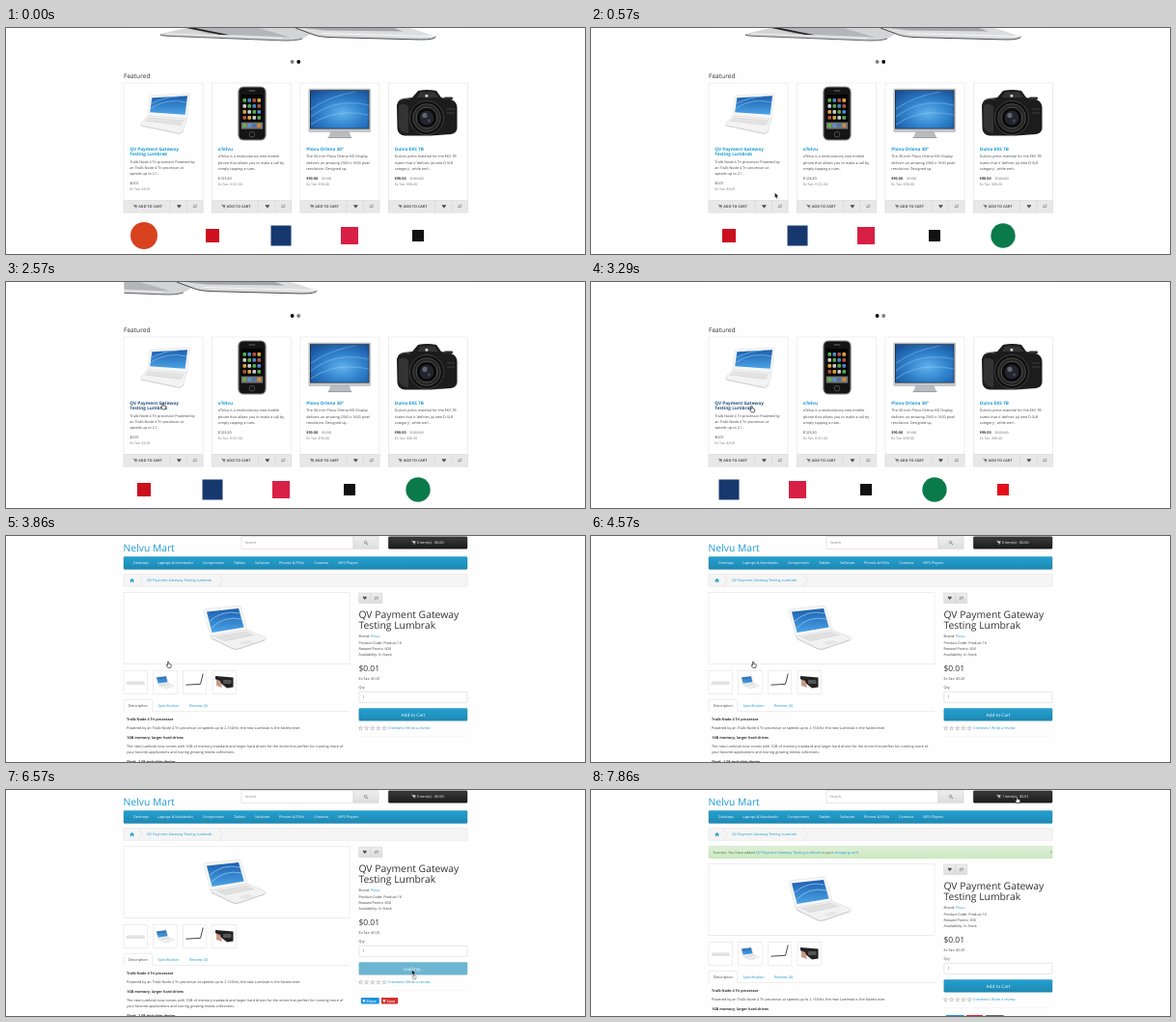
These frames come from a looping animation (600 px wide and 234 px high, 8 s). An HTML page:

```html
<!DOCTYPE html>
<html lang="en">
<head>
<meta charset="utf-8">
<title>Shop demo</title>
<style>
html, body { margin: 0; width: 100%; height: 100%; overflow: hidden; background: #fefefe; }
svg { display: block; width: 100%; height: 100%; }
text { font-family: "Open Sans", "Noto Sans", sans-serif; text-rendering: geometricPrecision; white-space: pre; }
.card { fill: #fff; stroke: #ddd; stroke-width: .5; }
.panel { fill: #fff; filter: drop-shadow(0 .4px .7px rgba(0,0,0,.22)); }
</style>
</head>
<body>
<svg id="stage" viewBox="0 0 600 234" preserveAspectRatio="none"></svg>
<script>
const LOOP = 8000, TICK = LOOP / 56;
const BLUE = '#1b9bd0', TEXT = '#454545', DARK = '#333';

// ---- drawing helpers ----
const text = (x, y, s, o = {}) =>
  `<text x="${x}" y="${y}" font-size="${o.size || 3.74}" fill="${o.fill || TEXT}"` +
  ` font-weight="${o.weight || 400}" text-anchor="${o.anchor || 'start'}"` +
  `${o.id ? ` id="${o.id}"` : ''}${o.strike ? ' text-decoration="line-through"' : ''}>${s}</text>`;
const rect = (x, y, w, h, fill, more = '') =>
  `<rect x="${x}" y="${y}" width="${w}" height="${h}" fill="${fill}" ${more}/>`;
const circle = (x, y, r, fill, more = '') => `<circle cx="${x}" cy="${y}" r="${r}" fill="${fill}" ${more}/>`;
const path = (d, fill, more = '') => `<path d="${d}" fill="${fill}" ${more}/>`;
const group = (id, s, more = '') => `<g id="${id}" ${more}>${s}</g>`;
const line = (c, w = .5) => `stroke="${c}" stroke-width="${w}"`;
const stops = cs => cs.map((c, i) => `<stop offset="${i / (cs.length - 1)}" stop-color="${c}"/>`).join('');
const grad = (id, ...cs) => `<linearGradient id="${id}" x2="0" y2="1">${stops(cs)}</linearGradient>`;
const at = (x, y, s, k = 1) => `<g transform="translate(${x} ${y}) scale(${k})">${s}</g>`;

const heart = (x, y, c = '#555') => at(x, y, path('M0 1.9L-1.9-.1A1.05 1.05 0 0 1 0-1.1A1.05 1.05 0 0 1 1.9-.1Z', c));
const swap = (x, y) => at(x, y, path('M-2-.8H2L1-1.6M2 .8H-2L-1 1.6', 'none', line('#777', .6)));
const cart = (x, y, c) => at(x, y,
  path('M-2.2-1.6H-1.2L-.5.5H1.6', 'none', line(c)) + path('M-1-1.2H2L1.5.2H-.6Z', c) +
  circle(-.2, 1.3, .45, c) + circle(1.3, 1.3, .45, c));

// ---- product pictures ----
const whiteLaptop =
  path('M149 71Q149 70 150 70L189 67.8Q190.5 67.8 190.3 69L187.3 94 146.8 90.5Z', '#f6f6f6', line('#ddd')) +
  path('M151.3 72.2L188 70.2 185.6 89.8 149.2 87.3Z', 'url(#screen)') +
  path('M150 83Q168 72 187 77M151 78Q166 71 178 71', 'none', line('#8cc6f0', .6)) +
  path('M146.8 91L187.3 94.3 183.5 107 180 109.5 141 101.5Q138 100 140 98.2Z', '#f3f3f3', line('#d6d6d6')) +
  path('M148 92.5L184.5 95.5 181.5 101 143.5 96.5Z', '#dcdcdc') +
  path('M146.5 93.8L183.5 97.2M145 95.2L182.5 99', 'none', line('#f8f8f8', .4)) +
  path('M140 101L180 109.5 184 106.5', 'none', line('#c0c0c0', .6));

const iconColors = ['#5aa84f', '#d9a441', '#4b86c6', '#c9c9c9', '#a9553f'];
let icons = '';
for (let r = 0; r < 4; r++) for (let c = 0; c < 4; c++)
  icons += rect(245.4 + c * 5, 73 + r * 6, 3.6, 3.8, iconColors[(r * 3 + c * 2) % 5], 'rx=".8"');
for (let c = 0; c < 4; c++) icons += rect(245.4 + c * 5, 99, 3.6, 3.8, ['#5fb548', '#5b93d4', '#4477b5', '#d98a35'][c], 'rx=".8"');
const phone =
  rect(240.9, 61, 28.2, 55, '#141414', 'rx="5" stroke="#8c8c8c" stroke-width="1.1"') +
  rect(243.8, 69, 22.4, 35.6, '#050505') + rect(243.8, 97.6, 22.4, 7, '#777') + icons +
  rect(251.5, 64.6, 7, .9, '#666', 'rx=".4"') + circle(255, 110.2, 2.8, '#111', line('#888'));

const monitor =
  path('M337 106H355L358 113.5H334Z', '#b9bcc0') + path('M333.5 113.6H358.5', 'none', line('#888', .8)) +
  rect(313.8, 63, 63.8, 44.5, '#c6c8cb', 'rx=".8" stroke="#999" stroke-width=".4"') +
  rect(315, 64.3, 61.4, 40.2, '#1a2433') + rect(315.7, 65, 60, 38.8, 'url(#sky)') +
  path('M316 92Q342 72 376 80M316 100Q340 83 376 90M316 84Q334 71 362 66', 'none', line('#9bd0f5', 1.2) + ' opacity=".35"');

const camera =
  path('M405 80Q406 74 412 73L421 72 427 65Q436 62.8 446 65L451 72 461 74Q467.5 76 467.5 83V104Q467 109 461 110L440 111.5H413Q406 110.5 405.5 104Z', '#1c1c1c') +
  path('M407 80Q412 77 417 81V109Q409 109 407 102Z', '#333') +
  path('M408 75Q413 72 419 74', 'none', line('#555', .8)) + path('M426 72L429 66.5H444L448 72Z', '#343434') +
  rect(454, 71.4, 9, 2.6, '#2d2d2d', 'rx="1"') + rect(434.6, 69, 2.6, 2.6, '#ddd') +
  circle(436, 93, 17.5, '#0f0f0f', line('#4a4a4a', .8)) + circle(436, 93, 14.4, '#262626', line('#6a6a6a', .5)) +
  circle(436, 93, 10.8, '#0a0a0a', line('#888', .5)) + circle(436, 93, 7.4, '#23242f') +
  circle(434, 90.4, 2.6, '#62656f') + circle(438.4, 96, 1.7, '#45414a') +
  path('M457 84H465M457 88H465', 'none', line('#3f3f3f', 1));

// ---- listing page ----
const products = [
  { title: ['QV Payment Gateway', 'Testing Lumbrak'], art: whiteLaptop, price: '$0.01', ex: '$0.01',
    desc: ['Trulb Node 4 Tri processor Powered by', 'an Trulb Node 4 Tri processor at', 'speeds up to 2.1..'] },
  { title: ['oTelvu'], art: phone, price: '$123.20', ex: '$101.00',
    desc: ['oTelvu is a revolutionary new mobile', 'phone that allows you to make a call by', 'simply tapping a nam..'] },
  { title: ['Plovu Orlena 30"'], art: monitor, price: '$90.00', old: '$1.00', ex: '$90.00',
    desc: ['The 30-inch Plovu Orlena HD Display', 'delivers an amazing 2560 x 1600 pixel', 'resolution. Designed sp..'] },
  { title: ['Dulvo EKS 7B'], art: camera, price: '$90.00', old: '$122.00', ex: '$80.00',
    desc: ["Dulvo's press material for the EKS 7B", "states that it 'defines (a) new D-SLR", "category', while we'r.."] }
];

function card(p, i) {
  const x = 122 + i * 91.5, tx = x + 6.3, y = 129 + (p.title.length - 1) * 5.4;
  return rect(x, 57, 82, 134, '', 'class="card"') + p.art +
    group('title' + i, p.title.map((s, n) => text(tx, 126.6 + n * 5.1, s, { size: 4.7, weight: 700, fill: 'currentColor' })).join(''), `color="${BLUE}"`) +
    p.desc.map((s, n) => text(tx, y + 5.4 + n * 6.25, s)).join('') +
    text(tx, y + 28, p.price, { fill: DARK, weight: p.old ? 700 : 400 }) +
    (p.old ? text(tx + 16, y + 28, p.old, { fill: '#888', strike: 1 }) : '') +
    text(tx, y + 33.9, 'Ex Tax: ' + p.ex, { fill: '#777', size: 3.6 }) +
    rect(x, 178.3, 82, 12.7, '#e8e8e8', line('#d8d8d8')) +
    path(`M${x + 48} 178.3V191M${x + 65.4} 178.3V191`, 'none', line('#d2d2d2')) +
    cart(x + 12, 184.6, '#555') + text(x + 15.3, 186, 'ADD TO CART', { weight: 700, fill: '#555' }) +
    heart(x + 57.4, 184.6) + swap(x + 73.8, 184.6);
}

const marks = [
  ['o', 14, '#d8421f'], ['s', 7, '#cc1020'], ['s', 10.5, '#16386f'], ['s', 9, '#d81f45'],
  ['s', 6, '#111'], ['o', 12.7, '#0b7a4b'], ['s', 6, '#e3101c']
];
const markRow = marks.map(([kind, r, c], i) => kind === 'o'
  ? circle(143 + i * 71, 215, r, c) : rect(143 + i * 71 - r, 215 - r, 2 * r, 2 * r, c)).join('');

// two thin laptops, back to back
const banner =
  path('M186 0L160 6Q158 7.2 161 8L283 12.8Q300 13.6 307 11L318 5V0Z', '#d3d4d6') +
  path('M188 0H262L294 9.5 210 6Z', '#b4b5b8') +
  path('M187 0H196L232 7.2 222 7Z', '#222') +
  path('M160 7.2Q162 8 168 8.3L283 12.8Q300 13.6 307 11', 'none', line('#555', .9)) +
  path('M166 5.8L286 10.4', 'none', line('#f4f4f4', .8)) +
  path('M300 0L319 7Q324 9 336 9.6L430 12Q444 12 445.5 9L428 3 418 0Z', '#dcdddf') +
  path('M308 0H402L412 3.5 330 2.5Z', '#a5a6a9') +
  path('M300 0L319 7Q324 9 336 9.6L430 12Q444 12 445.5 9', 'none', line('#4a4a4a', 1)) +
  path('M328 5.5L442 8.6', 'none', line('#fafafa', .9));

const listing =
  rect(122, -20, 356, 47, '', 'class="panel" rx="1.2"') +
  `<g clip-path="url(#slideClip)">${group('banner', banner)}</g>` +
  circle(296.6, 35, 1.9, '#000', 'id="dotA"') + circle(303.2, 35, 1.9, '#000', 'id="dotB"') +
  text(122, 52.2, 'Featured', { size: 6.6, fill: DARK }) +
  products.map(card).join('') +
  rect(122, 199, 356, 32, '', 'class="panel" rx="1.2"') +
  `<g clip-path="url(#markClip)">${group('marks', markRow)}</g>`;

// ---- product page ----
const full = 'QV Payment Gateway Testing Lumbrak';
const bigLaptop =
  path('M205 77.5Q205 76 207 75.6L241 72.2Q243 72 243.5 73.5L250 97 212 104Z', '#f7f7f7', line('#d8d8d8')) +
  path('M208 78.6L241 75 246.5 94.5 213.5 100Z', 'url(#screen)') +
  path('M210 89Q224 76 242 80M212 96Q226 82 244 86', 'none', line('#9ad0f5', .7)) +
  path('M212 104L250 97 269 105Q271 106.5 268 107.8L241 117Q238 118 235 116.8L213 106Z', '#f2f2f2', line('#d4d4d4')) +
  path('M217 104.6L249 98.8 258 102.4 227 109Z', '#d9d9d9') +
  path('M220 106L252 100M223.5 107.5L255 101.2', 'none', line('#f7f7f7', .5)) +
  path('M240 110.5L251 107.8 257 110 246 113Z', '#e6e6e6') +
  path('M213 106L235 116.8Q238 118 241 117L268 107.8', 'none', line('#bbb', .7));

const thumbs = [122, 152.8, 183.4, 214].map(x => rect(x, 139.3, 24.4, 24.2, '', 'class="card"')).join('') +
  path('M125.5 150.5H143L144 153.8H124.5Z', '#d9d9d9') + path('M126 151.5H142.5M125.5 152.7H143', 'none', line('#f4f4f4', .4)) +
  at(165, 151.3, `<g transform="translate(-238 -95)">${bigLaptop}</g>`, .3) +
  path('M186.5 154.2L201.5 153.3M201.5 153.3L204.2 142.5', 'none', line('#333', .9)) +
  path('M217 145L235.5 146.5V156.5L229 157.5 217 148Z', '#222') +
  path('M218 148.5L222 150 224 157 218 155Z', '#c99a86') + rect(225, 149, 8.5, 4, '#555');

const menu = [[132, 'Desktops'], [157, 'Laptops &amp; Notebooks'], [204, 'Components'], [236, 'Tablets'],
  [258, 'Software'], [283, 'Phones &amp; PDAs'], [319.3, 'Cameras'], [344.3, 'MP3 Players']];

const star = x => at(x, 199, path('M0-2L.6-.6 2-.5.9.5 1.2 1.9 0 1.2-1.2 1.9-.9.5-2-.5-.6-.6Z', '#fff', line('#888', .4)));
const bold = { weight: 700, fill: DARK };

const header =
  text(121.6, 16, 'Nelvu Mart', { size: 10.3, fill: BLUE }) +
  rect(244, .8, 116, 12.4, '#fff', line('#ccc')) + text(247.5, 8.4, 'Search', { fill: '#888' }) +
  rect(360, .8, 26, 12.4, 'url(#grey)', line('#ccc')) +
  circle(372.6, 6.6, 1.3, 'none', line('#666', .6)) + path('M373.6 7.6L375 9', 'none', line('#666', .8)) +
  rect(396.3, .8, 81.7, 12.4, 'url(#black)', 'rx="1" stroke="#111" stroke-width=".4"') +
  cart(422.6, 6.6, '#fff') + text(426, 8.2, '', { fill: '#fff', id: 'total' }) +
  rect(122, 21.5, 356, 13, 'url(#blue)', 'rx="1" stroke="#1b7fa5" stroke-width=".4"') +
  menu.map(([x, s]) => text(x, 29.3, s, { fill: '#fff', size: 3.68 })).join('') +
  rect(122, 39.5, 356, 12.8, '#f5f5f5', 'rx="1" stroke="#ddd" stroke-width=".5"') +
  path('M137.2 39.7L141.2 46 137.2 52.2M220.5 39.7L224.5 46 220.5 52.2', 'none', line('#ddd', .6)) +
  path('M128.2 46.1L130.6 43.9 133 46.1H132.3V48H131.1V46.6H130.1V48H128.9V46.1Z', BLUE) +
  text(146, 47.3, full, { fill: BLUE });

const details =
  rect(122, 58.7, 234, 74, '', 'class="card"') + bigLaptop + thumbs +
  path('M122 181.5V170.5Q122 169.5 123 169.5H150.7Q151.7 169.5 151.7 170.5V181.5H356', 'none', line('#ddd')) +
  text(126.8, 177.4, 'Description') + text(157.5, 177.4, 'Specification', { fill: BLUE }) + text(190, 177.4, 'Reviews (0)', { fill: BLUE }) +
  text(125, 190.8, 'Trulb Node 4 Tri processor', bold) +
  text(125, 200.2, 'Powered by an Trulb Node 4 Tri processor at speeds up to 2.16GHz, the new Lumbrak is the fastest ever.') +
  text(125, 209.5, '1GB memory, larger hard drives', bold) +
  text(125, 218.9, 'The new Lumbrak now comes with 1GB of memory standard and larger hard drives for the entire line perfect for running more of') +
  text(125, 225.1, 'your favorite applications and storing growing media collections.') +
  text(125, 234.5, 'Sleek, 1.08-inch-thin design', bold) +
  rect(365.8, 59, 11.8, 10.4, 'url(#grey)', line('#ccc')) + rect(377.8, 59, 12, 10.4, 'url(#grey)', line('#ccc')) +
  heart(371.8, 64.2) + swap(383.8, 64.2) +
  text(365.4, 85, 'QV Payment Gateway', { size: 10.36, fill: DARK }) + text(365.4, 96.2, 'Testing Lumbrak', { size: 10.36, fill: DARK }) +
  text(365.6, 105.3, `Brand: <tspan fill="${BLUE}">Plovu</tspan>`) +
  ['Product Code: Product 16', 'Reward Points: 600', 'Availability: In Stock'].map((s, i) => text(365.6, 111.5 + i * 6.2, s)).join('') +
  text(365.4, 140.2, '$0.01', { size: 8.5, fill: DARK }) + text(365.6, 148.9, 'Ex Tax: $0.01') + text(365.6, 158.2, 'Qty') +
  rect(365.8, 161.3, 112.2, 11, '#fff', 'rx=".8" stroke="#ccc" stroke-width=".5"') + text(369.5, 168.2, '1') +
  group('buy', rect(365.8, 178.5, 112.2, 12.8, 'url(#blue)', 'id="buyBox" rx="1" stroke="#1b7fa5" stroke-width=".4"') +
    text(422, 186.6, '', { size: 4.7, fill: '#fff', anchor: 'middle', id: 'buyText' })) +
  [367.5, 373.6, 379.8, 385.9, 392].map(star).join('') +
  text(395.4, 200.3, `<tspan fill="${BLUE}">0 reviews</tspan> / <tspan fill="${BLUE}">Write a review</tspan>`) +
  path('M365.8 207.5H478', 'none', line('#eee')) +
  group('share',
    rect(367.8, 215, 19, 6.4, '#1b95e0', 'rx=".8"') + circle(371, 218.2, 1.2, '#fff') + text(373.4, 219.6, 'Share', { fill: '#fff', weight: 600 }) +
    rect(388.8, 215, 17.4, 6.4, '#d3302f', 'rx=".8"') + rect(390.8, 217, 2.4, 2.4, '#fff') + text(394.8, 219.6, 'Save', { fill: '#fff', weight: 600 })) +
  rect(408.8, 215, 19, 6.4, '#5f6670', 'id="more" rx=".8"');

const alertBox =
  rect(122, 58.3, 356, 12.2, 'url(#green)', 'rx="1" stroke="#b5d9a5" stroke-width=".5"') +
  text(126.5, 65.8, `Success: You have added <tspan fill="${BLUE}">${full}</tspan> to your <tspan fill="${BLUE}">shopping cart</tspan>!`, { fill: '#3c763d' }) +
  text(475.4, 65.6, '×', { fill: '#8aa886', weight: 700, size: 4.4 });

// ---- pointers ----
const arrow = path('M0 0V5.6L1.3 4.5 2.2 6.5 3.1 6.1 2.2 4.1H4Z', '#000', line('#fff', .4));
const hand = path('M-.5.3Q.1-.5.7.3V2.3L2.8 2.9Q3.6 3.3 3.2 4.8L2.7 6.4H-.3L-2 4Q-1.7 3-.5 3.8Z', '#fff', line('#000', .6));
const stop = arrow + circle(2.6, 8, 2.1, '#fff', line('#777', .6)) + path('M1.1 6.5L4.1 9.5', 'none', line('#777', .6));

document.getElementById('stage').innerHTML =
  `<defs>${grad('blue', '#23a1d1', '#1f88b2')}${grad('grey', '#eee', '#ddd')}${grad('black', '#3a3a3a', '#1c1c1c')}` +
  `${grad('green', '#dff0d8', '#cde8c3')}${grad('screen', '#1c5fae', '#4ba3e6')}` +
  `<radialGradient id="sky" cx=".55" cy=".6" r=".75">${stops(['#5fb2ec', '#2f80cb', '#174f97'])}</radialGradient>` +
  `<clipPath id="slideClip">${rect(122.5, 0, 355, 26)}</clipPath><clipPath id="markClip">${rect(123, 200, 354, 30)}</clipPath></defs>` +
  group('listing', listing) + group('product', header + group('alert', alertBox) + group('details', details)) +
  group('pointer', group('arrow', arrow) + group('hand', hand) + group('stop', stop));

// ---- motion ----
const $ = id => document.getElementById(id);
const show = (id, on) => { $(id).style.display = on ? '' : 'none'; };
const move = (id, x, y = 0) => $(id).setAttribute('transform', `translate(${x} ${y})`);

// CSS "ease", solved by bisection
function ease(p) {
  if (p <= 0 || p >= 1) return p <= 0 ? 0 : 1;
  const curve = (u, a, b) => 3 * u * (1 - u) ** 2 * a + 3 * u * u * (1 - u) * b + u ** 3;
  let lo = 0, hi = 1;
  for (let i = 0; i < 20; i++) {
    const mid = (lo + hi) / 2;
    if (curve(mid, .25, .25) < p) lo = mid; else hi = mid;
  }
  return curve(lo, .1, 1);
}
const slide = (t, start) => ease((t - start) / 300);

const route = [[420, 205, 192], [570, 190.5, 170.5], [1140, 176, 150], [1570, 173, 146], [2290, 163, 127],
  [2570, 162.5, 125.5], [3290, 166.5, 128.5], [3570, 168, 130], [4570, 168, 130], [5570, 416, 181],
  [6430, 420.5, 186], [6710, 420.5, 186], [7720, 441.5, 7]];

function along(t) {
  const n = route.findIndex(k => k[0] > t);
  if (n < 1) return route[n ? route.length - 1 : 0].slice(1);
  const [a, ax, ay] = route[n - 1], [b, bx, by] = route[n];
  const p = (t - a) / (b - a), s = p * p * (3 - 2 * p);
  return [ax + (bx - ax) * s, ay + (by - ay) * s];
}

const shapes = [[0, 'arrow'], [2130, 'hand'], [4800, 'arrow'], [5400, 'hand'], [6420, 'stop'], [6700, 'arrow'], [7650, 'hand']];

function render(t) {
  const shop = t < 3565, added = t >= 6705, loading = t >= 6420 && !added;
  show('listing', shop);
  show('product', !shop);

  move('banner', -358 * slide(t, 2505));
  move('marks', -71 * (slide(t, 90) + slide(t, 2900)));
  $('dotA').setAttribute('opacity', t < 2500 ? .5 : 1);
  $('dotB').setAttribute('opacity', t < 2500 ? 1 : .5);
  $('title0').setAttribute('color', t < 2130 ? BLUE : '#23527c');

  show('alert', added);
  show('share', t >= 5000);
  show('more', added);
  move('details', 0, added ? 18 : 0);
  $('total').textContent = t < 6850 ? '0 item(s) - $0.00' : '1 item(s) - $0.01';
  $('buyText').textContent = loading ? 'Loading...' : 'Add to Cart';
  $('buy').setAttribute('opacity', loading ? .65 : 1);
  $('buyBox').setAttribute('fill', t >= 5400 && !added ? '#1f90bb' : 'url(#blue)');

  const shape = shapes.filter(s => s[0] <= t).pop()[1];
  ['arrow', 'hand', 'stop'].forEach(id => show(id, id === shape));
  show('pointer', t >= 420);
  move('pointer', ...along(t));
}

function loop() {
  const t = performance.now() % LOOP;
  render(Math.floor((t + 4) / TICK) % 56 * TICK);
  requestAnimationFrame(loop);
}
loop();
</script>
</body>
</html>
```
